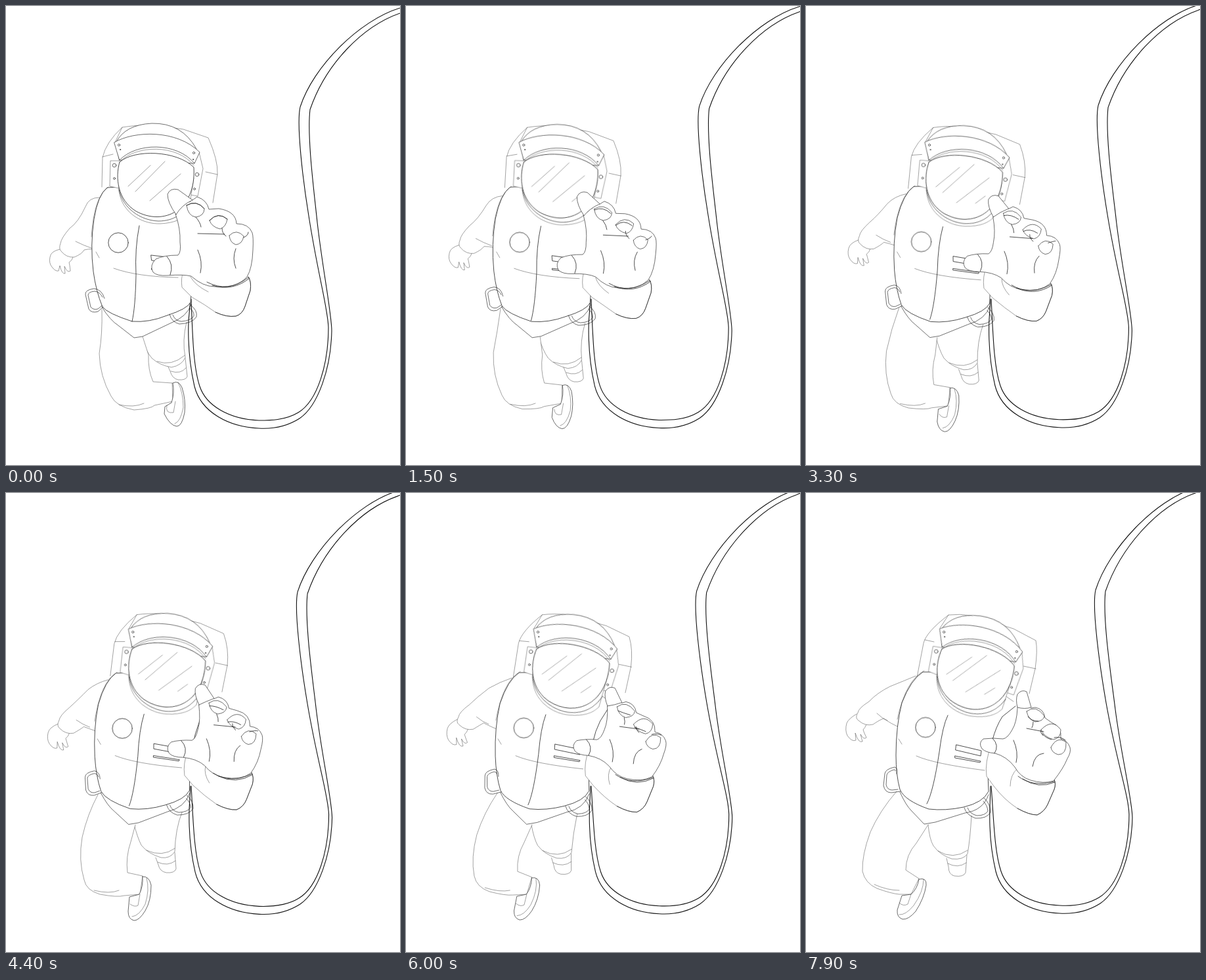
These frames come from a looping animation (600 by 700 pixels, 8 s). An HTML page without scripts:

```html
<!DOCTYPE html>
<html lang="en">
<head>
<meta charset="utf-8">
<title>Drifting astronaut</title>
<style>
html, body { margin: 0; width: 100%; height: 100%; overflow: hidden; background: #fff; }
svg { display: block; width: 600px; height: 700px; fill: #fff; stroke: #222; stroke-width: .65; stroke-linecap: round; stroke-linejoin: round; }
.thin { stroke-width: .5; stroke: #444; }
.mid { stroke-width: .8; }
.bold { stroke-width: 1.1; stroke: #111; }
.line { fill: none; }

/* every path glides from pose --a to pose --b; legs swing through --m */
.drift path { animation: drift 8s steps(80, jump-none) infinite; }
.swing path { animation: swing 8s infinite; }
.helmet { transform-origin: 165px 207px; animation: tilt 8s steps(80, jump-none) infinite; }
.badge { animation: badge 8s steps(80, jump-none) infinite; }
@keyframes drift { from { d: var(--a); } to { d: var(--b); } }
@keyframes swing {
  0% { d: var(--a); animation-timing-function: steps(44); }
  55% { d: var(--m); animation-timing-function: steps(36, jump-none); }
  100% { d: var(--b); }
}
@keyframes tilt {
  from { transform: translate(0, 0) rotate(0deg); }
  to { transform: translate(39px, -1px) rotate(9.1deg); }
}
@keyframes badge {
  from { transform: translate(0, 0); }
  to { transform: translate(11px, -3.5px); }
}
</style>
</head>
<body>
<svg viewBox="0 0 600 700">

<g id="backpack" class="drift thin">
  <path style="--a:path('M146 276L147 231Q152 208 177 185Q195 182 222 181L270 188L308 201Q323 235 322 256L315 300');
               --b:path('M169 281L179 229Q183 212 217 186Q234 184 252 187L316 207L350 225Q353 240 349 268L340 306')"/>
  <path class="line" style="--a:path('M147 230L163 226M304 253L322 257M177 185L166 208');
                            --b:path('M181 224L195 227M331 264L350 268M217 186L204 206')"/>
</g>

<g id="far-arm" class="drift thin">
  <path style="--a:path('M82 371Q68 374 67 383Q65 392 70 398Q75 405 80 404L82 396Q85 409 90 408L89 397Q94 408 98 404Q97 394 96 391Q101 388 102 383');
               --b:path('M77 337Q65 344 62 351Q59 362 63 370Q70 380 76 377L75 366Q80 382 86 379L83 368Q88 377 92 373Q88 365 87 361Q90 358 92 353')"/>
  <path style="--a:path('M142 292Q126 292 121 306Q110 330 97 339Q84 354 83 362Q80 370 84 374Q92 384 104 383Q116 378 119 372Q126 370 132 371');
               --b:path('M167 279Q148 287 128 295Q108 305 96 318Q80 328 79 335Q74 343 80 347Q90 356 102 353Q112 346 118 344Q130 352 141 357')"/>
  <path class="line" style="--a:path('M106 359Q118 365 132 370'); --b:path('M108 336Q116 344 124 347')"/>
</g>

<g id="back-leg" class="swing thin">
  <path style="--a:path('M246 548L250 557Q253 568 262 570Q274 571 276 565L273 537M251 557Q266 562 274 552');
               --m:path('M228 556L232 567Q234 577 244 579Q257 580 259 573L257 548M231 563Q246 570 258 561');
               --b:path('M214 557L217 570Q217 582 226 584Q240 586 243 579L245 552M216 565Q231 573 244 564')"/>
  <path style="--a:path('M206 504Q212 525 222 537Q234 548 252 551Q268 548 273 536Q268 510 275 482');
               --m:path('M195 505Q200 525 206 537Q216 550 236 556Q250 558 257 547Q258 512 268 487');
               --b:path('M186 506Q188 528 194 538Q204 552 222 558Q240 560 246 550Q250 528 252 492')"/>
  <path class="line" style="--a:path('M230 542Q252 550 272 533'); --m:path('M214 545Q238 556 257 542'); --b:path('M201 546Q224 560 246 545')"/>
</g>

<g id="front-leg" class="swing thin">
  <path style="--a:path('M146 463Q147 500 142 530Q143 565 160 595Q168 611 195 616Q222 614 226 609L254 603L253 575L224 573Q216 555 217 532L208 504');
               --m:path('M140 460Q124 490 116 525Q110 560 119 590Q122 606 143 612Q170 617 180 614L204 612L208 584L185 579Q182 555 190 532L197 506');
               --b:path('M138 455Q112 485 98 517Q85 552 86 577Q90 595 108 603Q130 611 142 612L160 612L172 588L152 575Q152 552 168 534L186 506')"/>
  <path class="line" style="--a:path('M172 608Q195 613 210 606'); --m:path('M134 606Q158 612 172 606'); --b:path('M104 597Q124 606 142 606')"/>
  <path class="mid" style="--a:path('M254 575Q263 570 268 582Q274 600 272 620Q268 641 260 641Q250 640 241 622L242 611L252 605Q257 590 254 575');
               --m:path('M208 585Q218 584 221 598Q221 622 212 637Q203 652 195 652Q186 650 186 638L188 616L203 612Q209 600 208 585');
               --b:path('M172 589Q184 586 183 598Q180 618 167 638Q156 651 147 650Q138 647 139 636L146 614L160 612Q170 603 172 589')"/>
  <path class="line" style="--a:path('M262 574Q270 590 270 612Q266 634 257 637M245 609Q242 622 255 620L258 603');
               --m:path('M214 587Q219 605 212 627Q203 645 192 646M189 627Q196 632 201 629L204 612');
               --b:path('M179 589Q179 608 164 629Q152 644 142 643M142 625Q148 631 155 627L160 612')"/>
</g>

<g id="pelvis" class="drift">
  <path style="--a:path('M146 459Q158 479 172 488L195 506L208 504L250 484Q276 474 282 455');
               --b:path('M143 456Q152 476 160 484L180 505L197 502L242 488Q270 484 278 460')"/>
</g>

<g id="cable" class="drift bold line">
  <path style="--a:path('M612 -1L600 3C538 22 468 92 448 154C442 180 452 265 461 320C475 410 490 460 491 490C491 545 475 602 445 620C425 632 402 632 385 632C340 630 305 610 295 580C285 550 284 500 282 447');
               --b:path('M605 -13L593 -8C531 11 461 85 441 148C435 175 447 262 457 320C473 410 491 460 492 490C492 545 476 599 446 617C426 629 403 630 386 629C341 627 307 607 297 577C287 547 286 500 282 447')"/>
  <path style="--a:path('M612 6L600 11C543 31 487 88 463 158C458 200 470 290 474 330C482 400 496 470 496 495C495 553 475 610 447 629C425 643 402 645 385 644C340 642 297 620 287 580C279 545 277 510 278 480L281 447');
               --b:path('M605 -5L593 0C536 20 480 81 456 150C451 193 466 288 471 330C480 400 497 470 497 495C496 551 476 607 448 626C426 640 403 642 386 641C341 639 299 617 289 577C281 543 279 510 280 480L281 447')"/>
</g>

<g id="torso" class="drift">
  <path class="mid" style="--a:path('M172 276L154 277Q140 288 134 325Q128 365 133 405Q137 435 147 459Q155 469 192 481Q218 483 245 472Q276 462 281 452L283 425Q287 390 285 370L285 320');
               --b:path('M200 273L178 273Q160 284 146 320Q137 355 137 400Q137 430 143 452Q150 469 187 482Q212 485 240 479Q270 472 278 455L277 428Q279 372 299 341L319 325')"/>
  <path class="line thin" style="--a:path('M156 276Q134 290 130 352M137 375L142 384M164 400Q200 413 262 414M268 300L275 305');
               --b:path('M180 271Q152 285 139 345M141 375L146 383M168 401Q195 413 272 423M303 309L316 318')"/>
  <path class="line mid" style="--a:path('M203 335Q196 370 198 410Q197 460 192 481'); --b:path('M216 339Q208 355 203 395Q194 455 184 474')"/>
  <path class="mid" style="--a:path('M221 380L262 385L261 393L222 388ZM222 400L262 404L261 406L222 402Z');
               --b:path('M229 384L267 393L266 401L228 392ZM227 401L266 409L265 411L227 404Z')"/>
  <circle class="badge mid" cx="171" cy="361" r="15.2"/>
  <path class="line" style="--a:path('M150 446Q146 432 134 431Q120 433 121 440L126 462Q130 469 140 466L148 459M147 444Q143 436 135 435Q125 436 125 441L129 459Q133 464 140 462L146 457');
               --b:path('M138 428Q140 419 135 418Q121 421 120 428L118 446Q120 457 130 457L144 455M136 424Q137 422 134 422Q124 425 123 430L122 445Q124 453 131 453L140 452')"/>
  <path class="line" style="--a:path('M249 470Q252 482 264 485Q284 484 290 474Q292 464 281 456M254 471Q257 480 267 481Q281 480 286 473Q287 466 280 461');
               --b:path('M241 480Q244 491 258 496Q275 497 281 487Q281 474 271 465M246 480Q249 489 260 492Q273 492 277 485Q276 476 270 470')"/>
</g>

<g id="near-arm" class="drift">
  <path class="thin" style="--a:path('M270 405Q266 415 268 429L283 444Q304 456 319 467Q336 475 350 473Q360 470 364 458L372 434Q374 420 369 413');
               --b:path('M282 385Q272 410 275 432L286 447Q302 468 322 481Q340 491 352 491Q363 486 368 475L378 452Q381 444 378 437')"/>
  <path class="line mid" style="--a:path('M319 467Q336 475 350 473Q360 470 364 458L372 434Q374 420 369 413');
               --b:path('M322 481Q340 491 352 491Q363 486 368 475L378 452Q381 444 378 437')"/>
  <path class="line thin" style="--a:path('M281 413Q288 426 308 436'); --b:path('M322 420Q311 430 311 447')"/>
</g>

<g id="helmet" class="helmet">
  <path class="thin" d="M173 236H159L158 275L172 278M294 223L300 248L292 290L281 288"/>
  <path class="thin" d="M172 282C177 318 210 333 235 332C256 331 270 325 278 314L286 262H172Z"/>
  <path class="line" d="M172 280C178 309 205 327 232 328C256 328 272 316 281 298"/>
  <path d="M168 207Q182 181 222 179Q268 178 290 218L287 240L173 235Z"/>
  <path class="mid" d="M173 238C166 262 170 296 198 313C240 336 290 312 286 246C260 220 195 218 173 238"/>
  <path d="M165 208C195 190 260 188 295 223L287 240C260 207 198 208 173 235Z"/>
  <path class="line thin" d="M174 237C198 212 260 210 286 243"/>
  <path class="line thin" d="M186 275L220 243M197 283L242 237M219 297L266 256M248 296L262 284"/>
  <circle cx="172" cy="212" r="1.6"/><circle cx="174" cy="219" r=".7"/>
  <circle cx="286" cy="224" r="1.6"/><circle cx="285" cy="234" r=".7"/>
  <circle cx="165" cy="243" r="2.8"/><circle cx="165" cy="263" r="1.5"/>
  <circle cx="291" cy="257" r="2.8"/><circle cx="287" cy="279" r="1.5"/>
</g>

<g id="glove" class="drift">
  <path style="--a:path('M258 317Q266 340 265 360Q267 375 262 380Q240 380 228 386Q218 396 224 406Q230 412 246 411Q270 409 282 412Q300 428 318 428Q350 432 367 413Q375 400 376 372Q377 352 375 346Q370 332 351 332Q350 313 324 309L309 310Q306 296 291 291L284 296');
               --b:path('M322 328Q321 350 314 361Q307 374 300 375Q285 373 270 375Q262 381 268 390Q274 396 288 397Q306 402 318 418Q326 433 342 438Q362 444 377 439Q392 420 398 405Q404 395 402 388Q398 377 388 375Q390 356 374 350L364 343Q362 329 349 327L343 328')"/>
  <path style="--a:path('M259 318Q246 300 246 287Q250 277 262 280L284 296Q268 303 259 318');
               --b:path('M322 327Q319 315 322 307Q328 299 336 303L343 327Q333 330 322 327')"/>
  <path style="--a:path('M275 304Q290 295 302 309Q302 320 289 322Q277 320 275 304');
               --b:path('M336 333Q350 322 363 340Q362 348 349 349Q338 345 336 333')"/>
  <path style="--a:path('M310 327Q323 313 337 325Q335 337 326 340Q313 337 310 327');
               --b:path('M358 361Q375 343 388 361Q388 374 377 376Q362 372 358 361')"/>
  <path style="--a:path('M340 350Q351 339 362 351Q360 363 350 364Q341 361 340 350');
               --b:path('M373 388Q382 370 396 380Q397 399 384 399Q374 396 373 388')"/>
  <path class="line mid" style="--a:path('M275 304Q290 295 302 309M310 327Q323 313 337 325M245 382Q256 394 250 410');
               --b:path('M338 341Q343 348 354 348M360 367Q365 374 374 376M284 374Q295 385 287 397')"/>
  <path class="line mid" style="--a:path('M292 347L333 348M289 322Q296 330 297 337M329 339Q329 347 335 351M292 372Q300 390 296 407M350 370Q344 385 350 400M362 353Q369 350 369 345');
               --b:path('M336 359L362 364M346 349Q346 355 344 358M357 362Q357 366 361 370M316 377Q324 395 320 411M362 397Q348 398 345 417M378 373Q388 371 395 377')"/>
  <path class="line mid" style="--a:path('M306 421Q338 438 369 414M314 426Q345 436 371 415'); --b:path('M323 432Q345 449 378 440M330 436Q354 452 379 441')"/>
</g>

</svg>
</body>
</html>
```
